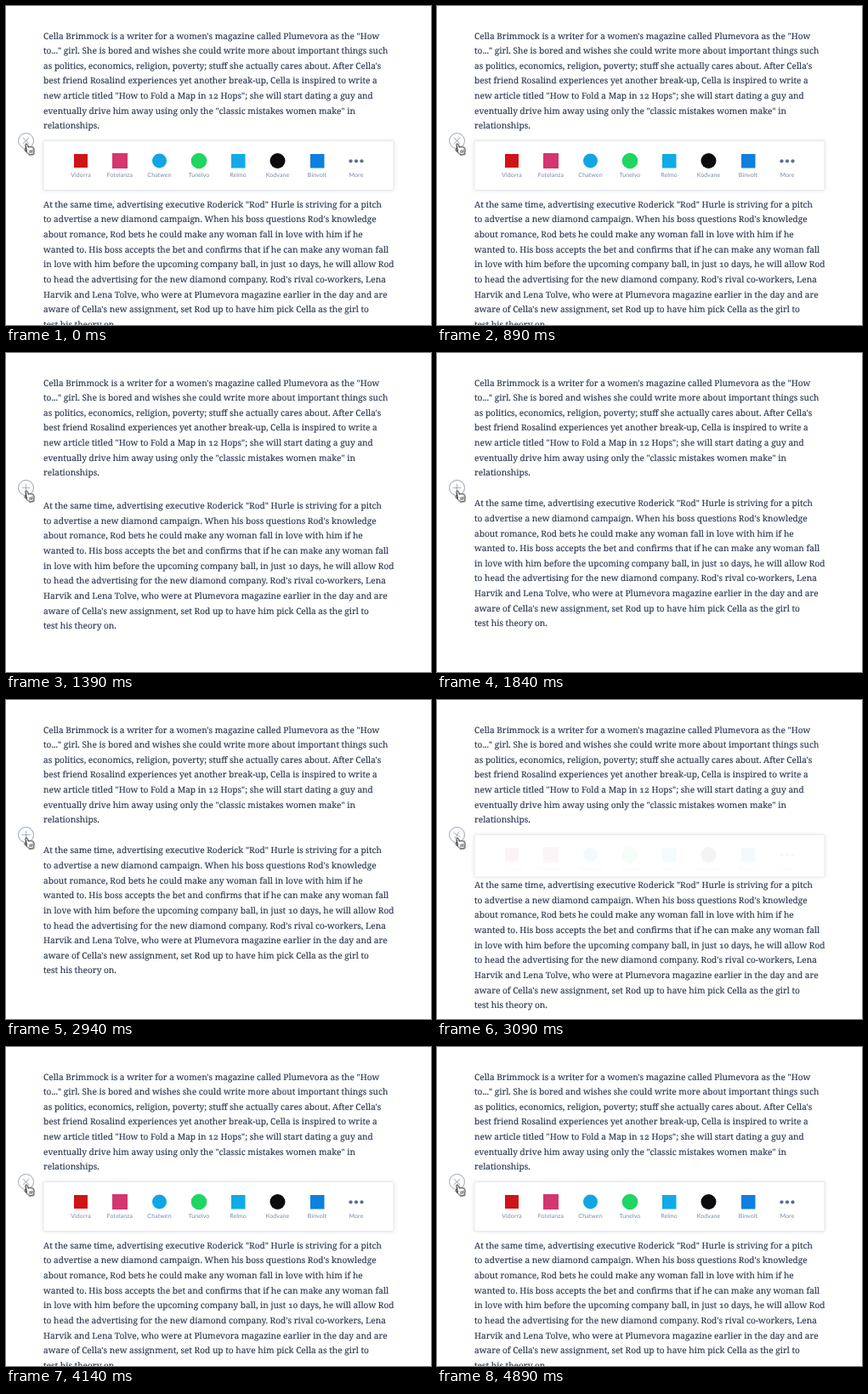
These frames come from a looping animation (500 px wide and 375 px high, 4.94 s). An HTML page:

```html
<!DOCTYPE html>
<html lang="en">
<head>
<meta charset="utf-8">
<title>Insert menu</title>
<style>
  html, body { margin: 0; width: 100%; height: 100%; overflow: hidden; background: #fff; }
  svg { display: block; width: 500px; height: 375px; text-rendering: geometricPrecision; }

  .copy { font: 10.13px "Noto Serif", Georgia, serif; font-variant-numeric: oldstyle-nums; fill: #2f3d54; stroke: #2f3d54; stroke-width: .16px; }
  .labels { font: 7px Lato, "Open Sans", sans-serif; letter-spacing: .1px; text-anchor: middle; fill: #7788aa; }
  .card { fill: #fff; stroke: #e7e9ec; filter: drop-shadow(0 0 2px rgba(60, 75, 100, .16)); }
  .ring { fill: #fff; stroke-width: .9px; }
  .mark { transform-origin: 23.5px 158.5px; stroke-width: .7px; }

  .after, .card, .items, .mark, .button { animation: 4940ms infinite both; }
  .after { animation-name: slide; }
  .card { animation-name: grow; }
  .items { animation-name: fade; }
  .mark { animation-name: turn; }
  .button { animation-name: tint; }

  /* closes 1140-1490 ms, opens 2940-3290 ms, items follow until 3400 ms */
  @keyframes slide {
    0%, 23.08%, 66.6%, 100% { transform: translateY(0); animation-timing-function: ease; }
    30.16%, 59.51% { transform: translateY(-56.5px); animation-timing-function: ease; }
  }
  @keyframes grow {
    0%, 23.08% { height: 58px; opacity: 1; animation-timing-function: ease; }
    27.1%, 59.51% { height: 0; opacity: 0; animation-timing-function: ease; }
    65%, 100% { height: 58px; opacity: 1; }
  }
  @keyframes fade {
    0%, 23.08% { opacity: 1; animation-timing-function: ease; }
    25.7%, 62.15% { opacity: 0; animation-timing-function: ease; }
    68.83%, 100% { opacity: 1; }
  }
  @keyframes turn {
    0%, 23.08%, 66.6%, 100% { transform: rotate(45deg); animation-timing-function: ease; }
    30.16%, 59.51% { transform: rotate(0deg); animation-timing-function: ease; }
  }
  @keyframes tint {
    0%, 23.08%, 66.6%, 100% { stroke: #929cab; }
    30.16%, 59.51% { stroke: #7f98aa; }
  }
</style>
</head>
<body>
<svg viewBox="0 0 500 375">
  <text class="copy" y="38.5">
    <tspan x="44">Cella Brimmock is a writer for a women's magazine called Plumevora as the "How</tspan>
    <tspan x="44" dy="17.65">to..." girl. She is bored and wishes she could write more about important things such</tspan>
    <tspan x="44" dy="17.65">as politics, economics, religion, poverty; stuff she actually cares about. After Cella's</tspan>
    <tspan x="44" dy="17.65">best friend Rosalind experiences yet another break-up, Cella is inspired to write a</tspan>
    <tspan x="44" dy="17.65">new article titled "How to Fold a Map in 12 Hops"; she will start dating a guy and</tspan>
    <tspan x="44" dy="17.65">eventually drive him away using only the "classic mistakes women make" in</tspan>
    <tspan x="44" dy="17.65">relationships.</tspan>
  </text>

  <rect class="card" x="44" y="158.5" width="412" height="58" rx="1.5"/>

  <g class="items">
    <rect x="80" y="174" width="16" height="16" fill="#d01316"/>
    <rect x="125" y="173" width="18" height="18" fill="#d4366f"/>
    <circle cx="180.5" cy="182" r="8.5" fill="#10a6e6"/>
    <circle cx="227" cy="182" r="9.3" fill="#1fd662"/>
    <rect x="265" y="174" width="16.5" height="16.5" fill="#10abe6"/>
    <circle cx="319.5" cy="182" r="9" fill="#0c0c0e"/>
    <rect x="358" y="174" width="16.5" height="16.5" fill="#0d80e0"/>
    <g fill="#5d6d90">
      <circle cx="405.5" cy="182.3" r="2.1"/>
      <circle cx="412" cy="182.3" r="2.1"/>
      <circle cx="418.5" cy="182.3" r="2.1"/>
    </g>
    <g class="labels">
      <text x="88" y="201">Vidorra</text>
      <text x="134" y="201">Fotelanza</text>
      <text x="180.5" y="201">Chatwen</text>
      <text x="227" y="201">Tunelvo</text>
      <text x="273" y="201">Relmo</text>
      <text x="319.5" y="201">Kodvane</text>
      <text x="366" y="201">Binvolt</text>
      <text x="412" y="201">More</text>
    </g>
  </g>

  <g class="after">
    <text class="copy" y="236.7">
      <tspan x="44">At the same time, advertising executive Roderick "Rod" Hurle is striving for a pitch</tspan>
      <tspan x="44" dy="17.65">to advertise a new diamond campaign. When his boss questions Rod's knowledge</tspan>
      <tspan x="44" dy="17.65">about romance, Rod bets he could make any woman fall in love with him if he</tspan>
      <tspan x="44" dy="17.65">wanted to. His boss accepts the bet and confirms that if he can make any woman fall</tspan>
      <tspan x="44" dy="17.65">in love with him before the upcoming company ball, in just 10 days, he will allow Rod</tspan>
      <tspan x="44" dy="17.65">to head the advertising for the new diamond company. Rod's rival co-workers, Lena</tspan>
      <tspan x="44" dy="17.65">Harvik and Lena Tolve, who were at Plumevora magazine earlier in the day and are</tspan>
      <tspan x="44" dy="17.65">aware of Cella's new assignment, set Rod up to have him pick Cella as the girl to</tspan>
      <tspan x="44" dy="17.65">test his theory on.</tspan>
    </text>
  </g>

  <g class="button">
    <circle class="ring" cx="23.5" cy="158.5" r="9"/>
    <path class="mark" d="M18.5 158.5h10M23.5 153.5v10"/>
  </g>

  <!-- pointing hand -->
  <g transform="rotate(-12 23.7 162)" stroke="#111" stroke-linejoin="round" stroke-linecap="round">
    <path fill="#fff" stroke-width="1" d="M22.6 170.2V163.2c0-1.6 2.2-1.6 2.3 0l.4 3.6c.3-1 1.9-.9 2 .3.4-.9 1.8-.7 2 .5.5-.8 1.9-.4 1.9.8v3.2c0 1.4-1 2.2-1 4.2h-5.4c-.2-1.5-1.7-2.6-2.5-4l-1.7-2.7c-.7-1.2.7-2 1.4-1.2z"/>
    <path fill="none" stroke-width=".7" d="M25.8 170.6v2.8M27.5 170.6v2.8M29.2 170.6v2.8"/>
  </g>
</svg>
</body>
</html>
```
